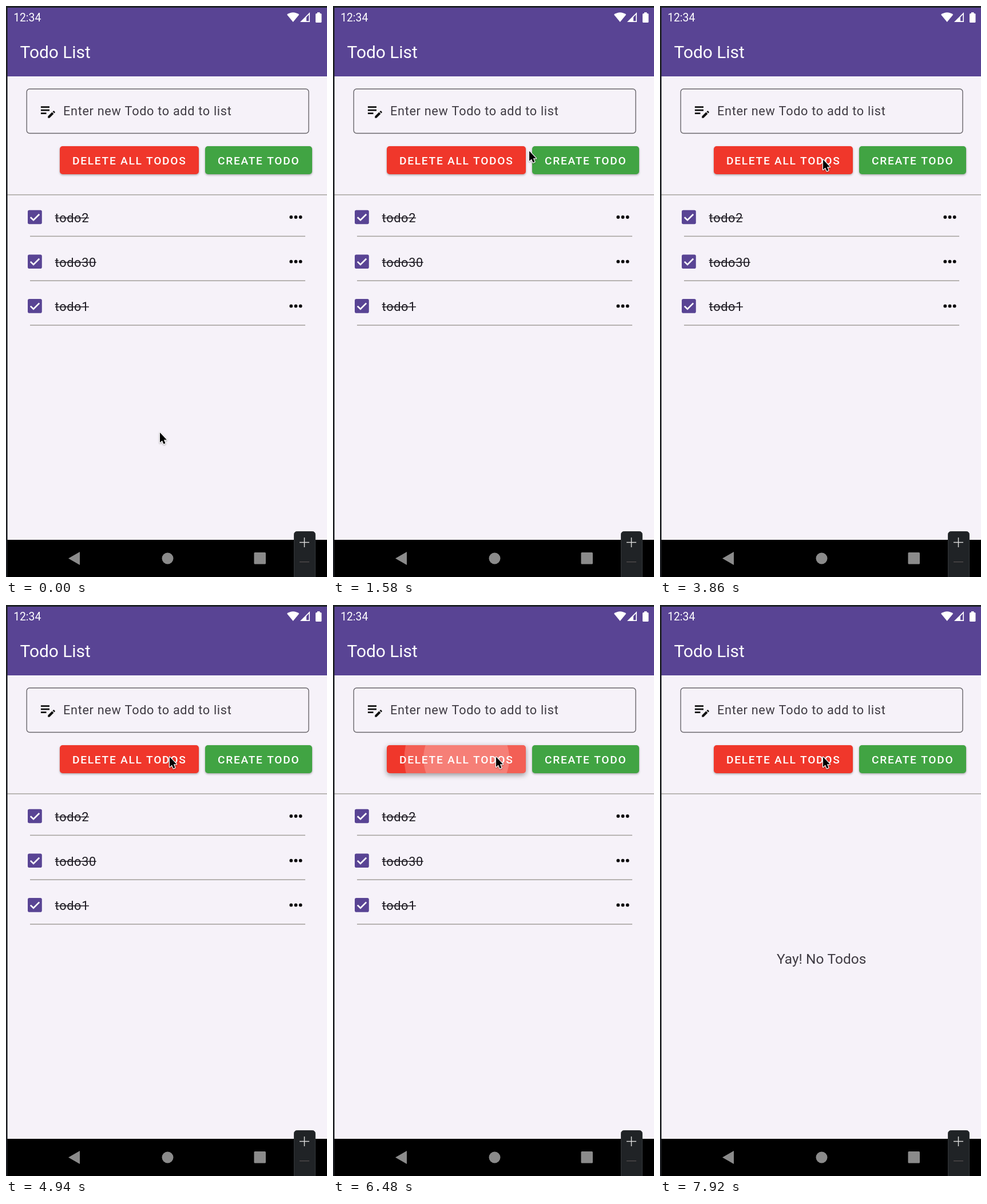
An HTML page with a canvas for the animation above (8000 ms loop, 561 by 998 pixels).

```html
<!DOCTYPE html>
<html lang="en">
<head>
<meta charset="utf-8">
<title>Todo List</title>
<style>
  html, body { margin: 0; width: 100%; height: 100%; overflow: hidden; background: #f6f2f9; }
  canvas { display: block; width: 561px; height: 998px; }
</style>
</head>
<body>
<canvas id="stage"></canvas>
<script>
const W = 561, H = 998, LOOP = 8000;
const PURPLE = '#594494', PAPER = '#f6f2f9', RED = '#f0372b', GREEN = '#41a443';
const PRESS = 6370, CLEAR = 6680;

const canvas = document.getElementById('stage');
const ctx = canvas.getContext('2d');
const dpr = window.devicePixelRatio || 1;
canvas.width = W * dpr;
canvas.height = H * dpr;

const notePath = new Path2D('M3 10h11v2H3zM3 6h11v2H3zM3 16h7v-2H3zM18.01 12.87l.71-.71c.39-.39 1.02-.39 1.41 0l.71.71c.39.39.39 1.02 0 1.41l-.71.71zM17.3 13.58l-5.3 5.3V21h2.12l5.3-5.3z');
const arrowPath = new Path2D('M1 1.6V19L4.9 15.4L7.6 21.6L10.5 20.3L7.9 14.3H13Z');

// Pointer stops: [time, x, y]
const stops = [
  [0, 268, 744], [600, 268, 744], [1340, 342, 252], [1900, 342, 252],
  [2180, 346, 220], [2700, 346, 220], [3300, 284, 267], [4300, 284, 267],
  [4600, 285, 264], [5700, 285, 264], [5900, 284, 264], [LOOP, 284, 264]
];

const clamp = v => Math.max(0, Math.min(1, v));
const phase = (t, from, span) => clamp((t - from) / span);
const smooth = p => p * p * (3 - 2 * p);
const easeOut = p => 1 - (1 - p) * (1 - p);

function rect(x, y, w, h, color) {
  ctx.fillStyle = color;
  ctx.fillRect(x, y, w, h);
}

function roundPath(x, y, w, h, r) {
  ctx.beginPath();
  ctx.roundRect(x, y, w, h, r);
}

function disc(x, y, r, color) {
  ctx.fillStyle = color;
  ctx.beginPath();
  ctx.arc(x, y, r, 0, Math.PI * 2);
  ctx.fill();
}

function poly(points, color) {
  ctx.fillStyle = color;
  ctx.beginPath();
  points.forEach(([x, y]) => ctx.lineTo(x, y));
  ctx.closePath();
  ctx.fill();
}

function text(str, x, y, size, color, spacing = 0, weight = 400) {
  ctx.font = `${weight} ${size}px Roboto, sans-serif`;
  ctx.letterSpacing = spacing + 'px';
  ctx.fillStyle = color;
  ctx.fillText(str, x, y);
}

function statusBar() {
  text('12:34', 13.2, 27, 19.3, '#fff');
  ctx.fillStyle = '#fff';
  ctx.beginPath();
  ctx.moveTo(501.7, 28);
  ctx.lineTo(491, 15);
  ctx.quadraticCurveTo(501.7, 7.5, 512.4, 15);
  ctx.fill();
  poly([[514, 28], [531, 28], [531, 11]], '#fff');
  poly([[525, 26.3], [529.4, 26.3], [529.4, 15], [525, 19.4]], PURPLE);
  ctx.fillStyle = '#fff';
  roundPath(541, 13, 10.5, 16, 1.5);
  ctx.fill();
  rect(544, 11, 4.5, 3, '#fff');
}

function inputField() {
  ctx.strokeStyle = '#68656b';
  ctx.lineWidth = 1.4;
  roundPath(36.2, 145, 492.8, 77.5, 5);
  ctx.stroke();
  ctx.save();
  ctx.translate(56.8, 167);
  ctx.scale(1.37, 1.37);
  ctx.fillStyle = '#111';
  ctx.fill(notePath);
  ctx.restore();
  text('Enter new Todo to add to list', 100, 191, 21.7, '#3f3b43', 0.68);
}

function button(label, x, w, color, lift, ripple) {
  const y = 245, h = 49;
  ctx.save();
  ctx.shadowColor = `rgba(0,0,0,${0.32 + 0.08 * lift})`;
  ctx.shadowBlur = (3.5 + 6 * lift) * dpr;
  ctx.shadowOffsetY = (1.5 + 1.5 * lift) * dpr;
  ctx.fillStyle = color;
  roundPath(x, y, w, h, 5);
  ctx.fill();
  ctx.restore();
  if (ripple) {
    ctx.save();
    roundPath(x, y, w, h, 5);
    ctx.clip();
    ripple();
    ctx.restore();
  }
  text(label, x + 22, 277, 19.15, '#fff', 1.72, 500);
}

function buttons(t) {
  const fade = 1 - phase(t, 6600, 200);
  const lift = smooth(phase(t, PRESS, 110)) * (1 - smooth(phase(t, 6600, 250)));
  const active = t > PRESS && fade > 0;
  button('DELETE ALL TODOS', 94, 243, RED, lift, active && (() => {
    const p = easeOut(phase(t, PRESS, 225));
    const cx = 284 + (215.5 - 284) * p;
    const cy = 264 + 5.5 * p;
    const tint = `rgba(255,255,255,${0.2 * fade})`;
    disc(cx, cy, 146 * p, tint);
    disc(cx, cy, 101 * p, tint);
  }));
  button('CREATE TODO', 348, 187, GREEN, 0);
}

function todoRow(label, i) {
  const y = 369 + i * 77.7;
  ctx.fillStyle = PURPLE;
  roundPath(38, y - 12.3, 24.8, 24.6, 2.8);
  ctx.fill();
  ctx.strokeStyle = '#fff';
  ctx.lineWidth = 2.7;
  ctx.beginPath();
  ctx.moveTo(42.8, y + 0.2);
  ctx.lineTo(48, y + 5.2);
  ctx.lineTo(58.2, y - 5);
  ctx.stroke();

  text(label, 85.6, y + 8.8, 21.7, '#1f1c24', 0.68);
  rect(86, y + 0.7, ctx.measureText(label).width - 0.5, 1.5, '#1f1c24');
  for (let k = -1; k <= 1; k++) disc(506.5 + k * 8.2, y, 2.9, '#0c0b0d');
  rect(42, y + 32.7, 481, 1.5, '#a29f9b');
}

function list(t) {
  const gone = phase(t, CLEAR, 100);
  if (gone < 1) {
    ctx.globalAlpha = 1 - gone;
    ['todo2', 'todo30', 'todo1'].forEach(todoRow);
    ctx.globalAlpha = 1;
  }
  if (t >= CLEAR + 60) text('Yay! No Todos', 204, 627, 24.5, '#3f3b43');
}

function navBar() {
  rect(0, 933, W, 65, '#000');
  const grey = '#8b8b8b';
  poly([[109, 965.5], [129, 954], [129, 977]], grey);
  disc(282.5, 965.5, 10, grey);
  ctx.fillStyle = grey;
  roundPath(433.5, 955, 20.5, 20.5, 1.5);
  ctx.fill();
}

function zoomPanel() {
  ctx.fillStyle = '#202326';
  ctx.strokeStyle = '#34373a';
  ctx.lineWidth = 1;
  roundPath(503.5, 918.5, 37, 90, 5);
  ctx.fill();
  ctx.stroke();
  rect(513, 936.8, 17, 1.4, '#dedede');
  rect(520.8, 929, 1.4, 17, '#dedede');
  rect(513, 971, 17, 1.2, '#554f50');
}

function pointer(t) {
  let i = 0;
  while (i < stops.length - 2 && t >= stops[i + 1][0]) i++;
  const [t0, x0, y0] = stops[i], [t1, x1, y1] = stops[i + 1];
  const p = smooth(phase(t, t0, t1 - t0));
  ctx.save();
  ctx.translate(x0 + (x1 - x0) * p, y0 + (y1 - y0) * p);
  ctx.lineJoin = 'round';
  ctx.lineWidth = 2.4;
  ctx.strokeStyle = '#fff';
  ctx.shadowColor = 'rgba(0,0,0,0.35)';
  ctx.shadowBlur = 2.5 * dpr;
  ctx.shadowOffsetY = dpr;
  ctx.stroke(arrowPath);
  ctx.shadowColor = 'transparent';
  ctx.fillStyle = '#000';
  ctx.fill(arrowPath);
  ctx.restore();
}

function draw(t) {
  ctx.setTransform(dpr, 0, 0, dpr, 0, 0);
  rect(0, 0, W, H, PAPER);
  rect(0, 0, W, 123, PURPLE);
  statusBar();
  text('Todo List', 24.5, 91, 29.9, '#fff');
  inputField();
  buttons(t);
  rect(0, 329.3, W, 1.4, '#a19e99');
  list(t);
  navBar();
  rect(0, 0, W, 3, '#1f2328');
  rect(0, 0, 2.6, H, '#1c1e22');
  zoomPanel();
  pointer(t);
}

const start = performance.now();
function tick() {
  draw((performance.now() - start) % LOOP);
  requestAnimationFrame(tick);
}
tick();
</script>
</body>
</html>
```
